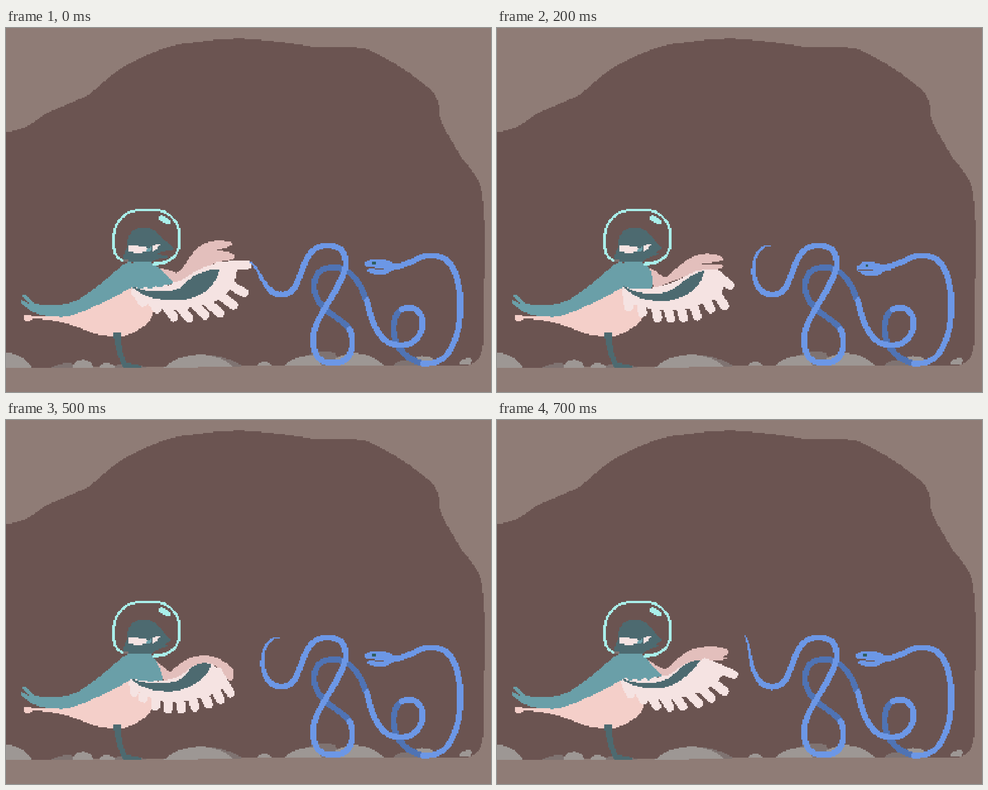
An HTML page with a canvas for the animation above (800 ms loop, 864 px wide and 648 px high).

```html
<!DOCTYPE html>
<html>
<head>
<meta charset="utf-8">
<style>
html, body { margin: 0; height: 100%; overflow: hidden; background: #8f7c76 }
canvas { display: block; width: 864px; height: 648px; image-rendering: pixelated }
</style>
</head>
<body>
<canvas id="stage" width="384" height="288"></canvas>
<script>
const W = 384, H = 288, SCALE = 2.25;
const C = {
  wall: '#8f7c76', cave: '#6b5451', rock: '#9d9794', shade: '#7f7371',
  teal: '#6a9fa8', dark: '#4d6a70', pink: '#f4cfc9', light: '#f5e3e2', far: '#e3bfbc',
  glass: '#a9efea', snake: '#6c97e6', back: '#4f73b4', eye: '#2f5e60'
};
const view = document.getElementById('stage').getContext('2d');
const pad = document.createElement('canvas');
pad.width = W; pad.height = H;
const ink = pad.getContext('2d', { willReadFrequently: true });
ink.lineCap = 'round';
ink.lineJoin = 'round';
const image = view.createImageData(W, H);
const pixels = new Uint32Array(image.data.buffer);

// Paints one shape with hard pixel edges; a width means stroke.
function paint(shape, color, width) {
  const path = typeof shape === 'string' ? new Path2D(shape) : shape;
  ink.setTransform(1, 0, 0, 1, 0, 0);
  ink.clearRect(0, 0, W, H);
  ink.setTransform(1 / SCALE, 0, 0, 1 / SCALE, .4, 0);
  ink.fillStyle = ink.strokeStyle = color;
  ink.lineWidth = width || 1;
  if (width) ink.stroke(path); else ink.fill(path);
  const data = ink.getImageData(0, 0, W, H).data;
  const n = parseInt(color.slice(1), 16);
  const abgr = (0xff000000 | (n & 255) << 16 | n & 0xff00 | n >> 16) >>> 0;
  for (let i = 0; i < pixels.length; i++) if (data[i * 4 + 3] > 127) pixels[i] = abgr;
}

const nums = s => s.match(/[\d.]+/g).map(Number);
const lerp = (a, b, t) => a + (b - a) * t;
function mix(a, b) {
  const mixed = {};
  for (const key in a) {
    const to = nums(b[key]);
    let i = 0;
    mixed[key] = a[key].replace(/[\d.]+/g, n => lerp(+n, to[i++], .5));
  }
  return mixed;
}

const curl = '487,387 446,385 444,475 490,475';
const poses = [
  {
    far: 'M262,424 C280,428 295,432 303,436 C318,430 325,400 348,386 C365,377 385,377 402,382 C404,390 385,393 370,395 C380,396 400,398 407,405 C408,414 390,413 370,418 L300,460Z',
    patch: '268,424 280,435 290,444 298,454',
    top: 'M225,462 C255,470 300,460 330,437 C350,424 375,416 398,415',
    base: '378,424 300,472 230,470',
    tips: '428,421 423,471 404,493 380,508 354,511 325,517 298,515 268,500 243,488',
    stripe: 'M225,460 C250,472 290,472 310,462 C330,440 350,430 380,429 C372,460 345,484 305,484 C270,484 240,480 225,460Z',
    tail: '434,417 450,424 458,475 490,475'
  }, {
    far: 'M262,424 C280,428 290,442 300,444 C315,430 340,405 365,402 C380,400 402,404 402,412 C402,417 380,417 358,420 C375,420 400,419 402,424 C402,430 380,430 366,430 L280,463Z',
    patch: '268,424 275,435 278,448 276,462',
    top: 'M222,460 C255,470 305,460 332,443 C350,432 370,427 388,430',
    base: '390,438 325,478 230,470',
    tips: '414,458 404,494 380,500 356,513 331,516 308,517 285,516 258,507 234,496',
    stripe: 'M222,458 C245,472 270,477 300,470 C325,462 335,440 368,432 C365,455 345,480 300,486 C260,488 235,475 222,458Z',
    tail: curl
  }, {
    far: 'M262,424 C272,434 275,460 286,463 C300,450 310,438 345,432 C365,429 385,435 392,446 C398,455 400,465 398,475 C397,477 396,476 396,475 C390,460 380,450 366,447 L285,468Z',
    patch: '258,420 266,430 271,448 269,465',
    top: 'M219,460 C250,470 295,475 318,460 C330,447 345,446 368,448',
    base: '388,462 315,490 226,470',
    tips: '390,506 372,510 347,516 324,518 302,520 277,518 252,506 238,495 224,482',
    stripe: 'M219,460 C245,472 270,480 300,472 C325,460 325,446 350,446 C358,446 365,447 372,449 C355,470 320,486 280,486 C245,484 228,472 219,460Z',
    tail: curl
  }, {
    far: 'M258,422 C270,432 280,450 288,452 C300,438 320,422 352,421 C372,422 386,432 392,450 C394,460 396,470 396,480 C396,481 395,480 395,479 C392,470 380,445 364,437 L280,468Z',
    patch: '262,424 268,432 273,450 271,466',
    top: 'M222,460 C250,470 300,470 318,452 C328,438 345,435 364,437',
    base: '378,455 310,485 226,468',
    tips: '390,497 374,501 351,506 328,512 303,515 278,514 255,506 237,490 224,478',
    stripe: 'M222,460 C250,472 290,475 310,466 C325,455 320,440 345,436 C352,436 357,436 362,437 C358,462 330,478 300,483 C260,485 238,476 222,460Z',
    tail: curl
  }, {
    far: 'M260,422 C275,432 285,440 298,445 C312,430 325,420 345,416 C370,414 400,430 417,440 C418,448 412,452 405,449 C395,445 385,438 380,435 C375,433 372,432 368,430 L285,465Z',
    patch: '258,416 268,428 280,444 286,460',
    top: 'M222,460 C250,470 295,462 318,446 C332,432 350,428 372,430',
    base: '374,442 305,480 226,468',
    tips: '408,475 388,494 368,506 344,510 320,515 298,514 275,513 250,500 231,490',
    stripe: 'M222,460 C250,472 290,468 310,458 C325,445 335,430 350,430 C356,430 362,430 368,431 C360,455 330,478 295,482 C260,482 235,476 222,460Z',
    tail: curl
  }, {
    far: 'M260,420 C275,432 285,438 298,444 C315,435 325,412 355,406 C375,402 400,402 411,410 C413,420 400,422 385,419 C395,422 410,422 410,425 C395,428 380,427 365,427 L290,462Z',
    patch: '258,418 270,430 284,446 293,455',
    top: 'M222,460 C250,470 290,464 315,448 C330,432 350,426 382,427',
    base: '370,432 295,474 228,468',
    tips: '420,453 404,483 381,495 358,505 330,510 307,511 283,509 260,498 237,488',
    stripe: 'M222,460 C250,472 285,470 305,460 C325,445 330,430 362,427 C350,444 328,468 296,477 C260,480 235,472 222,460Z',
    tail: '441,384 453,402 446,475 490,475'
  }
];
const [p0, p1, p2, p3, p4, p5] = poses;
const steps = [p0, mix(p0, p1), p1, p2, p3, mix(p3, p4), p4, p5];

// Snake heads: outline, mouth, eye
const heads = [
  ['M702,418 L690,418 L672,411 L650,411 L637,418 L637,423 L646,426 L642,433 L655,438 L676,438 L690,431 L702,430Z', 'M641,427 L670,428', 'M651,416 h7 v5 h-7Z'],
  ['M702,420 L684,420 L668,416 L652,416 L641,424 L640,432 L654,440 L676,441 L690,433 L702,431Z', 'M644,431 L670,430', 'M655,421 h5 v5 h-5Z'],
  ['M704,419 L680,421 L660,424 L646,433 L645,440 L655,447 L670,447 L683,437 L704,431Z', 'M652,443 L674,437', 'M657,431 h5 v5 h-5Z']
];
const headAt = [0, 0, 1, 2, 1, 0, 0, 0];

function backdrop() {
  paint('M-9,-9 H880 V660 H-9Z', C.wall);
  paint('M-9,185 L0,185 C25,183 45,172 68,153 C95,140 125,130 148,118 C170,100 190,75 235,55 C265,42 290,30 320,27 C360,22 390,18 425,19 C470,22 520,28 550,34 C580,35 620,33 645,38 C680,55 715,75 735,93 C760,112 770,120 771,150 C773,175 790,190 808,228 C825,248 845,270 847,295 C852,330 852,380 851,430 C850,480 851,530 849,560 C847,585 840,597 820,600 L540,601 L0,605 H-9Z', C.cave);
  paint('M78,605 C90,597 110,595 120,598 V605Z M163,605 C195,597 215,597 256,604Z M360,582 C390,585 410,594 420,602 L300,604Z M537,583 C550,575 570,574 585,578 L600,600 H555Z M688,600 C700,590 720,588 745,592 L760,600Z', C.shade);
  paint('M-9,577 L0,577 C18,578 38,590 45,605 H-9Z M117,604 C120,588 150,585 155,604Z M163,604 C170,594 185,594 194,604Z M280,605 C300,586 325,581 350,581 C375,584 395,592 402,603Z M447,601 C452,592 465,592 473,601Z M495,601 C510,586 530,582 550,584 L562,601Z M575,601 C590,575 640,568 673,601Z M728,588 C735,582 755,582 763,592 L768,600 H745Z M806,598 C810,588 822,586 831,589 L826,598Z', C.rock);
}

function bird(p, open) {
  paint('M30,512 L45,512 C70,514 100,516 120,510 C160,490 200,475 225,458 L262,500 C263,520 240,540 210,548 C190,550 165,548 145,540 C120,528 80,517 48,518 L40,522 L31,521Z', C.pink);
  paint(p.far, C.far);
  paint('M212,418 C190,435 160,465 130,482 C110,493 85,495 62,493 L50,490 L35,475 L28,475 L30,481 L46,494 L27,484 L25,489 L42,503 C55,511 80,515 100,514 C130,511 163,492 195,477 L225,460 L262,430 L258,416Z', C.teal);
  const [ax, ay, ...c] = nums(p.patch);
  paint(`M222,462 L215,416 L${ax},${ay} C${c} C262,466 250,468 240,467Z`, C.teal);
  paint('M190,543 L204,541 C203,560 206,580 214,596 L240,600 L242,604 L208,604 C200,590 193,570 190,543Z', C.dark);

  const beak = open
    ? 'L298,391 L298,395 L275,398 L268,402 L288,406 L287,409 L266,411'
    : 'L293,393 L280,400 L290,401 L266,410';
  paint('M212,416 C205,408 211,396 216,390 C213,370 225,356 240,355 C258,354 268,362 276,373 ' + beak + ' L258,417Z', C.dark);
  paint('M217,386 L250,390 L250,398 C240,401 225,400 217,397Z M260,387 L275,383 L268,393 L260,399Z', C.light);
  paint('M250,392 L258,389 L257,397 L250,400Z', C.teal);
  paint('M203,414 L216,414', C.shade, 4);
  paint('M206,414 C196,408 191,400 191,390 L191,368 C193,347 209,326 232,324.5 L270,324.5 C291,326 307,348 307.5,364 L307.5,384 C307,404 292,419 262,420', C.glass, 4.8);
  paint('M270,335 C278,331 291,338 293,347 C289,351 271,345 270,335Z', C.glass);

  // Feathers fan out from a quadratic base line to their tips.
  const [x0, y0, x1, y1, x2, y2] = nums(p.base);
  const bend = (a, b, c, t) => lerp(lerp(a, b, t), lerp(b, c, t), t);
  const tips = nums(p.tips);
  let web = p.top, fan = '';
  for (let i = 0; i < 9; i++) {
    const t = i / 8, x = bend(x0, x1, x2, t), y = bend(y0, y1, y2, t);
    const tx = tips[2 * i], ty = tips[2 * i + 1];
    web += ` L${lerp(x, tx, .7)},${lerp(y, ty, .7)}`;
    fan += `M${x},${y} L${tx},${ty} `;
  }
  paint(web + 'Z', C.light);
  paint(fan, C.light, 16);
  paint(p.stripe, C.dark);
}

function snake(p, head) {
  paint('M612,537 C595,515 570,510 555,485 C540,455 550,427 580,426 C615,424 630,455 641,484 M703,501 C685,515 687,552 700,570 C712,588 728,594 742,597', C.back, 10.5);
  paint('M490,475 C535,475 515,387 572,387 C598,387 606,402 604,425 C600,460 547,515 547,550 C544,585 560,596 580,596 C605,597 616,582 616,562 C616,550 615,543 611,537 M642,485 C650,520 658,545 680,560 C710,573 741,560 741,525 C741,503 725,493 704,501 M742,597 C780,600 795,575 805,535 C812,490 810,455 794,425 C781,403 755,400 733,410 C718,418 710,422 694,425', C.snake, 10.5);
  const [a, b, c, d, e, f, g, h] = nums(p.tail);
  const cubic = (k, l, m, n, t) => k * (1 - t) ** 3 + 3 * l * t * (1 - t) ** 2 + 3 * m * t * t * (1 - t) + n * t ** 3;
  const tail = new Path2D();
  for (let i = 0; i <= 100; i++) {
    const t = i / 100, x = cubic(a, c, e, g, t), y = cubic(b, d, f, h, t);
    const r = Math.min(5.2, 1.2 + 5 * t);
    tail.moveTo(x + r, y);
    tail.arc(x, y, r, 0, 7);
  }
  paint(tail, C.snake);
  const [outline, mouth, eye] = heads[head];
  paint(outline, C.snake);
  paint(mouth, C.cave, 2.6);
  paint(eye, C.eye);
}

backdrop();
const scene = pixels.slice();
let shown = -1;
function draw(now) {
  const step = Math.floor(now % 800 / 100);
  if (step !== shown) {
    shown = step;
    pixels.set(scene);
    bird(steps[step], step === 0);
    snake(steps[step], headAt[step]);
    view.putImageData(image, 0, 0);
  }
  requestAnimationFrame(() => draw(performance.now()));
}
draw(performance.now());
</script>
</body>
</html>
```
